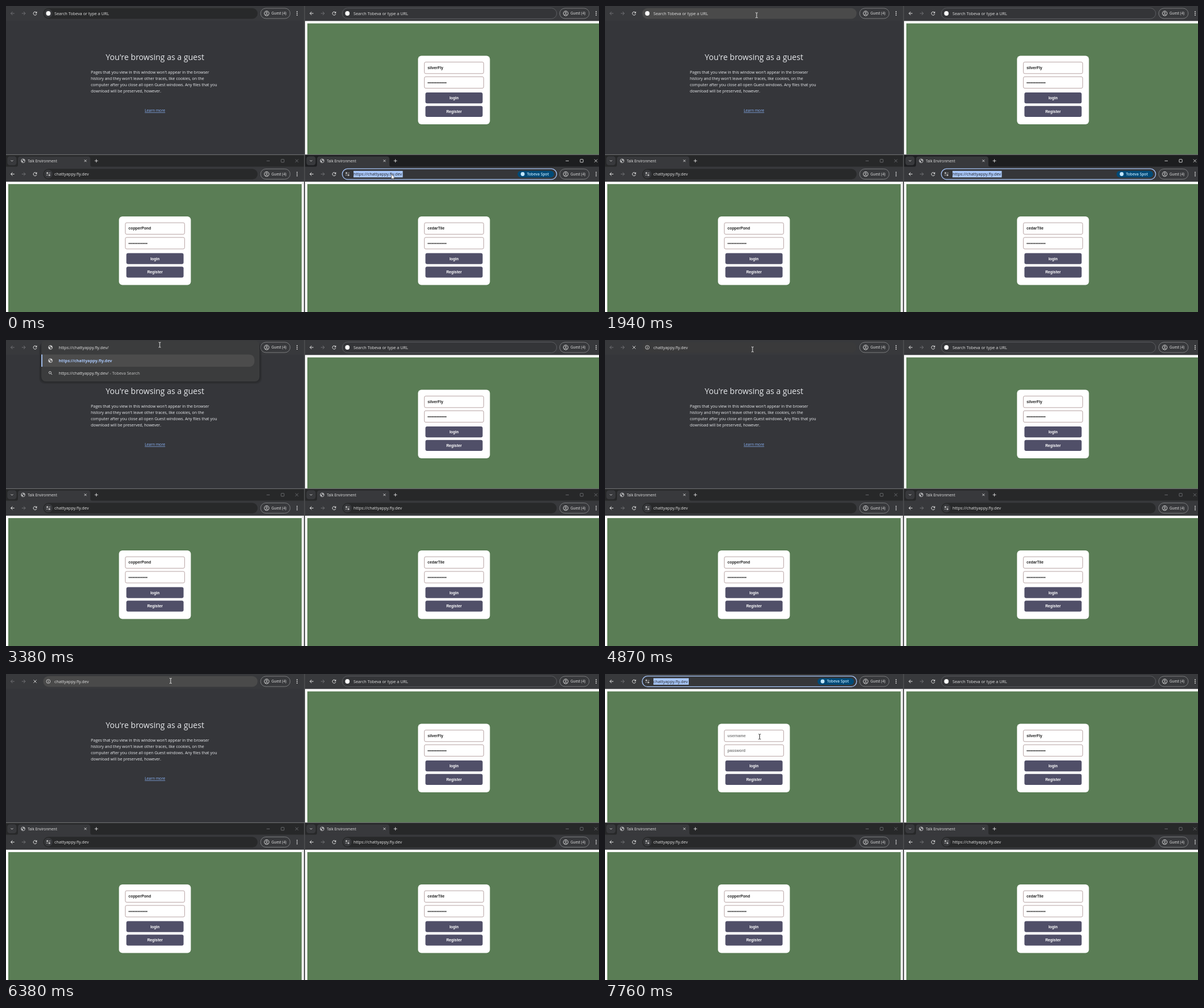
Animation, 1041 px wide and 538 px high, one loop 8000 ms. Source, as an HTML page:

```html
<!DOCTYPE html>
<html lang="en">
<head>
<meta charset="utf-8">
<title>Four browser windows</title>
<style>
html, body { margin: 0; width: 100%; height: 100%; overflow: hidden; background: #35363a; }
svg { display: block; width: 100%; height: 100%; }
text { font-family: "Open Sans", "Noto Sans", sans-serif; white-space: pre; }
.form { font-family: "Liberation Sans", Arial, sans-serif; font-weight: 700; font-size: 6.8px; }
</style>
</head>
<body>
<svg id="stage" viewBox="0 0 1041 538"></svg>
<script>
const LOOP = 8000;
const DX = 525, DY = 282.5;
const HOST = 'chattyappy.fly.dev';
const URL_TEXT = 'https://' + HOST;
const HINT = 'Search Tobeva or type a URL';
const C = {
  bar: '#38393c', page: '#35363a', box: '#28292a', hover: '#4a4a4a', focus: '#353639',
  text: '#e3e3e3', dim: '#707174', blue: '#a8c7fa', green: '#5a7d55', button: '#504f68'
};

const rect = (x, y, w, h, fill, r = 0, more = '') =>
  `<rect x="${x}" y="${y}" width="${w}" height="${h}" rx="${r}" fill="${fill}" ${more}/>`;
const circle = (x, y, r, fill, more = '') =>
  `<circle cx="${x}" cy="${y}" r="${r}" fill="${fill}" ${more}/>`;
const line = (d, color, w = 0.9) =>
  `<path d="${d}" fill="none" stroke="${color}" stroke-width="${w}"/>`;
const text = (x, y, s, size = 7.3, fill = C.text, more = '') =>
  `<text x="${x}" y="${y}" font-size="${size}" fill="${fill}" ${more}>${s}</text>`;
const at = (x, y, s) => `<g transform="translate(${x} ${y})">${s}</g>`;

// Icons, each centred on 0,0
const cross = (r, c) => line(`M${-r} ${-r}L${r} ${r}M${r} ${-r}L${-r} ${r}`, c);
const arrow = c => line('M3.2 0H-3M0-3L-3 0L0 3', c, 1);
const reload = line('M2.6-1.4A3 3 0 1 0 2.9 1', C.text, 1) + `<path d="M3.3-3.4V-.3H.2Z" fill="${C.text}"/>`;
const globe = (c, r = 3.4) => circle(0, 0, r, 'none', `stroke="${c}" stroke-width=".9"`) +
  `<path d="M-3-1L0 .3L-.8 3L-2.6 1.4ZM.2-3L2.6-1.8L2.6.8L1-.4L-.4-1.4Z" fill="${c}"/>`;
const icons = {
  search: circle(0, 0, 3.9, '#fff'),
  tune: line('M-3.2-1.8H-1M1.6-1.8H3.4M-3.2 1.8H-1.4M1.2 1.8H3.4', C.text) +
    circle(-1.6, -1.8, 1.2, 'none', `stroke="${C.text}" stroke-width=".8"`) +
    circle(1.6, 1.8, 1.2, 'none', `stroke="${C.text}" stroke-width=".8"`),
  info: circle(0, 0, 3.4, 'none', `stroke="${C.text}" stroke-width=".8"`) + line('M0-1.9V-1M0-.3V2', C.text)
};
const person = circle(0, 0, 4.2, 'none', `stroke="${C.text}" stroke-width=".9"`) +
  circle(0, -1.2, 1.4, 'none', `stroke="${C.text}" stroke-width=".8"`) +
  line('M-2.8 2.9Q0 .4 2.8 2.9', C.text, 0.8);

function omnibox(o) {
  const edge = o.ring ? `stroke="${C.blue}" stroke-width="1.3"` : o.edge ? `stroke="${o.edge}" stroke-width=".8"` : '';
  let s = rect(65.3, 3.7, 376.4, 18.7, o.fill, 9.35, edge);
  if (o.fill === C.box) s += circle(74.3, 13, 7.4, C.bar);
  s += at(74.3, 13, icons[o.icon]);
  if (o.sel) s += rect(85, 7.4, o.sel, 11.4, C.blue);
  s += text(85, 15.6, o.text, 7.25, o.sel ? '#202124' : C.text);
  if (o.caret) s += rect(o.caret, 8, 0.8, 10, '#fff');
  if (o.chip) {
    s += rect(373, 7.2, 64, 11.8, '#004a77', 5.9) + circle(382, 13, 3.4, '#c2e7ff') +
      text(389.5, 15.4, 'Tobeva Spot', 6.6, '#c2e7ff', 'font-weight="600"');
  }
  return s;
}

function toolbar(o) {
  const dots = [-3, 0, 3].map(d => circle(511, 13 + d, 0.9, C.text)).join('');
  return rect(0, 0, 523.5, 26.2, C.bar) +
    at(11.5, 13, arrow(o.noBack ? C.dim : C.text)) +
    `<g transform="translate(31 13) scale(-1 1)">${arrow(C.dim)}</g>` +
    at(51, 13, o.loading ? cross(2.6, C.text) : reload) +
    omnibox(o) +
    rect(447, 4, 51.8, 18, 'none', 9, 'stroke="#8b8c8f" stroke-width=".8"') +
    at(457.6, 13, person) + text(466, 15.3, 'Guest (4)', 6.3) + dots;
}

function tabStrip(active) {
  const ctl = active ? C.text : C.dim;
  return rect(0, 262, 523.5, 21, active ? '#1d1e20' : '#272829') +
    rect(2.3, 264.3, 16.2, 15.8, C.bar, 4.5) + line('M8.6 271.2L10.5 273.1L12.4 271.2', C.text) +
    `<path d="M17 283Q21 283 21 279V269Q21 264.5 25.500 264.5H143.5Q148 264.5 148 269V279Q148 283 152 283Z" fill="${C.bar}"/>` +
    at(30, 272.2, globe('#c4c5c7')) + text(38.3, 274.6, 'Talk Environment', 6.4) +
    at(139.4, 272.2, cross(1.9, C.text)) + line('M155.7 272.2H161.500M158.600 269.3V275.1', C.text) +
    line('M457.500 272.3H463', ctl) + rect(483, 269.6, 5.2, 5.2, 'none', 0.6, `stroke="${ctl}" stroke-width=".9"`) +
    at(510.5, 272.2, cross(2.6, ctl));
}

function field(y, value, secret) {
  const dots = `<path d="M216.3 ${y + 10.5}h31" stroke="#111" stroke-width="2" stroke-linecap="round" stroke-dasharray="0 2.57"/>`;
  return rect(209.4, y, 104.2, 20.2, '#fff', 2.5, 'stroke="#a58c8c" stroke-width=".8"') +
    (secret ? dots : value);
}

const formText = (x, y, s, fill, more = '') =>
  `<text class="form" x="${x}" y="${y}" fill="${fill}" ${more}>${s}</text>`;

function loginPage(user, height) {
  const button = (y, s) => rect(211.3, y, 100.4, 19.2, C.button, 3) +
    formText(261.5, y + 12, s, '#fff', 'text-anchor="middle"');
  return rect(0, 26.2, 523.3, height, '#fff') + rect(519, 26.2, 4.3, height, '#ececec') +
    rect(4, 30.6, 515, height, C.green) +
    rect(198.3, 87.6, 126.2, 120.4, '#fff', 6) +
    field(98.6, formText(215, 110.9, user || 'username', user ? '#222' : '#808080')) +
    field(124.4, formText(215, 136.6, 'password', '#808080'), user) +
    button(152.1, 'login') + button(175.8, 'Register');
}

function guestPage() {
  const lines = [
    "Pages that you view in this window won't appear in the browser",
    "history and they won't leave other traces, like cookies, on the",
    'computer after you close all open Guest windows. Any files that you',
    'download will be preserved, however.'
  ];
  return rect(0, 26.2, 523.3, 235, C.page) +
    text(261.5, 94.6, "You're browsing as a guest", 14.05, '#e8eaed', 'text-anchor="middle"') +
    lines.map((s, i) => text(149, 118.6 + i * 11.15, s, 7.04, '#e8eaed')).join('') +
    text(261.5, 186.1, 'Learn more', 6.65, '#8ab4f8', 'text-anchor="middle" text-decoration="underline"');
}

function suggestions(caret) {
  const shadow = [4, 2.5, 1].map(d => rect(62 - d, 4, 383 + 2 * d, 69 + d, '#000', 9, 'opacity=".1"')).join('');
  return shadow + rect(62, 1, 383, 72, '#3b3c3d', 8) +
    `<path d="M62 25.5H426Q436.200 25.5 436.200 36.2Q436.200 47 426 47H62Z" fill="#4c4c4c"/>` +
    rect(62, 25.5, 1.8, 21.5, C.blue) +
    at(78, 13, globe(C.text)) + at(78, 36.2, globe(C.text)) +
    circle(77.3, 57.3, 2, 'none', `stroke="${C.text}" stroke-width=".9"`) + line('M78.800 58.8L81 61', C.text) +
    text(92.5, 15.6, URL_TEXT + '/', 7.25) +
    text(92.5, 38.8, URL_TEXT, 7.25, C.blue, 'font-weight="700"') +
    text(92.5, 60.6, URL_TEXT + '/<tspan fill="#c7c7c7"> - Tobeva Search</tspan>', 7.25) +
    (caret ? rect(181.3, 8, 0.8, 10, '#fff') : '');
}

// time, x, y, kind: a = arrow, i = light beam, d = dark beam, '' = hidden
const path = [
  [0, 676.5, 295.3, 'a'], [1000, 652, 258, 'a'], [1130, 625.5, 221.3, 'a'], [1280, 0, 0, ''],
  [1560, 520, 160, 'a'], [1690, 390, 72, 'a'], [1810, 300, 20, 'i'], [1940, 266.2, 16.2, 'i'],
  [2340, 0, 0, ''], [2590, 268.5, 14, 'i'], [3130, 269.2, 12.5, 'i'], [3250, 269.6, 10, 'i'],
  [3380, 269.9, 8.5, 'i'], [4870, 259, 16.5, 'i'], [5000, 262, 36, 'a'], [5130, 266.5, 58, 'a'],
  [5270, 300, 74, 'a'], [5400, 337, 82, 'a'], [5540, 354, 75, 'a'], [5670, 367, 69, 'a'],
  [6100, 345.3, 51, 'a'], [6250, 312, 17, 'i'], [6380, 289, 12, 'i'], [7050, 288.6, 16, 'i'],
  [7190, 273.3, 89.800, 'a'], [7340, 272.4, 115, 'd'], [7490, 272, 112.500, 'd'], [7620, 271.7, 111, 'd'],
  [7760, 271.5, 110.2, 'd']
];

function pointer(t) {
  const [, x, y, kind] = path.findLast(p => p[0] <= t);
  if (!kind) return '';
  if (kind === 'a') {
    return at(x, y, '<path d="M0 0V9.3L2.1 7.4L3.6 10.7L5 10.1L3.6 6.9H6.5Z" fill="#fff" stroke="#222" stroke-width=".6"/>');
  }
  return at(x, y, line('M-2-4.5Q0-4.5 0-3.5Q0-4.5 2-4.5M0-3.5V3.5M-2 4.5Q0 4.5 0 3.5Q0 4.5 2 4.5',
    kind === 'd' ? '#111' : '#f2f2f2', 0.9));
}

function firstWindow(t) {
  const within = (a, b) => t >= a && t < b;
  if (t >= 6670) {
    const picked = t >= 6800;
    return loginPage('', 235) + toolbar({
      fill: C.focus, ring: true, icon: 'tune', text: HOST, chip: true,
      sel: picked ? 62 : 0, caret: picked ? 0 : 147
    });
  }
  const loading = t >= 3780;
  const focused = within(2090, 2730);
  let fill = C.box;
  if (within(1810, 2090) || within(3780, 4870) || t >= 6250) fill = C.hover;
  if (within(4870, 5000)) fill = '#3a3a3b';
  if (focused) fill = C.focus;
  return guestPage() + toolbar({
    noBack: true, loading, fill, ring: focused,
    icon: loading ? 'info' : 'search', text: loading ? HOST : HINT,
    caret: within(2090, 2590) ? 85 : 0
  }) + (within(2730, 3780) ? suggestions(t < 3130) : '');
}

function scene(t) {
  const active = t < 2090;
  const below = s => at(0, DY, s);
  const left = firstWindow(t) + below(loginPage('copperPond', 260)) + tabStrip(false) +
    below(toolbar({ fill: C.box, icon: 'tune', text: HOST }));
  const right = loginPage('silverFly', 235) +
    toolbar({ fill: '#343538', edge: '#65666a', icon: 'search', text: HINT }) +
    below(loginPage('cedarTile', 260)) + tabStrip(active) +
    below(toolbar({
      fill: active ? C.focus : C.box, ring: active, icon: 'tune', text: URL_TEXT,
      sel: active ? 86.500 : 0, chip: active
    }));
  return left + at(DX, 0, right) + rect(523.2, 0, 1.8, 538, '#4b4c4e') +
    rect(0, 260.8, 1041, 1.2, '#6a6b6d') + pointer(t);
}

const stage = document.getElementById('stage');
const start = performance.now();
let shown = '';

function update() {
  const next = scene((performance.now() - start) % LOOP);
  if (next !== shown) stage.innerHTML = shown = next;
  requestAnimationFrame(update);
}
update();
</script>
</body>
</html>
```
